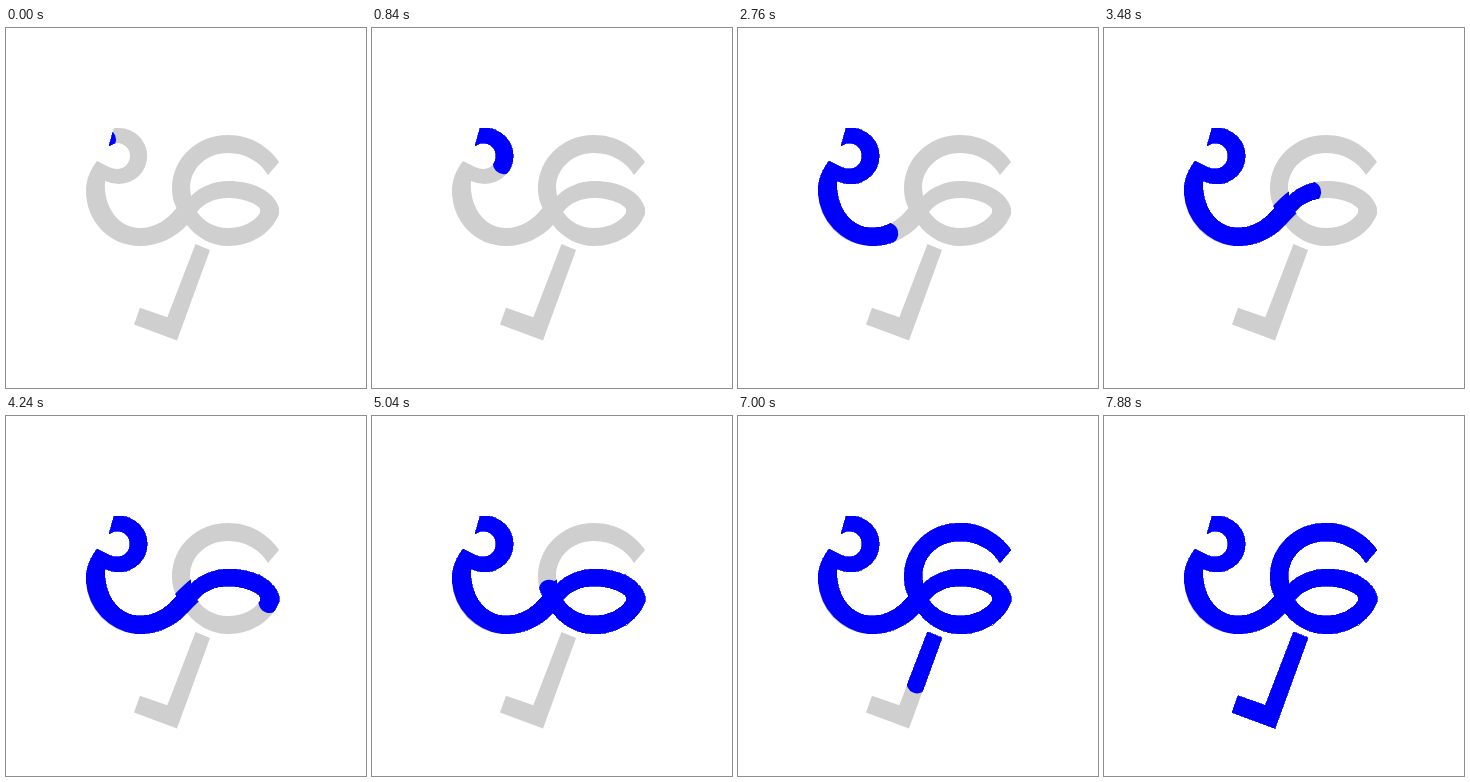
An HTML page that plays this animation: 360x360 px, repeating every 7920 ms.

```html
<!DOCTYPE html>
<html lang="en">
<head>
<meta charset="utf-8">
<title>Stroke order</title>
<style>
  html, body { margin: 0; width: 100%; height: 100%; overflow: hidden; background: #fff; }
  svg { display: block; width: 100%; height: 100%; }
  .ink { fill: #00f; stroke: #00f; stroke-width: .7; shape-rendering: crispEdges; }
  .pen {
    fill: none;
    stroke: #fff;
    stroke-width: 22;
    stroke-linecap: round;
    stroke-linejoin: miter;
  }
  .curl { stroke-dasharray: 600 1200; animation: curl 7920ms linear infinite; }
  .leg { stroke-dasharray: 140 300; animation: leg 7920ms linear infinite; }

  /* dash offset = dash length minus the distance drawn */
  @keyframes curl {
    0% { stroke-dashoffset: 599; }
    21.21% { stroke-dashoffset: 492; }
    34.85% { stroke-dashoffset: 398; }
    40.4% { stroke-dashoffset: 353; }
    50.5% { stroke-dashoffset: 278; }
    53.54% { stroke-dashoffset: 257; }
    60.6% { stroke-dashoffset: 187; }
    63.64% { stroke-dashoffset: 147; }
    70.7% { stroke-dashoffset: 102; }
    77.78% { stroke-dashoffset: 33; }
    80.05%, 100% { stroke-dashoffset: 0; }
  }
  @keyframes leg {
    0%, 79.4% { stroke-dashoffset: 165; }
    79.7% { stroke-dashoffset: 140; }
    90.9% { stroke-dashoffset: 62; }
    99.5%, 100% { stroke-dashoffset: 0; }
  }
</style>
</head>
<body>
<svg viewBox="0 0 360 360">
  <defs>
    <path id="glyph" fill-rule="evenodd" d="
      M108 100 Q110 100 113 100 A28.2 28 0 0 1 113 156 Q106 156 99 153
      C97 178 112 200 134 200 C149 200 161 192 170.5 180
      C167.5 174 166 168 166 161 C166 130 191 107 222 107
      C244 107 262 118 273 134 L262 147
      C254 134 240 125 222 125 C200 125 184 141 184 160 L185 168
      C194 159 208 153 222 153 C247 153 268 163 273 180 L273 186
      C266 205 245 218 222 218 C206 218 191 210 181 197
      C169 210 152 218 134 218 C103 218 80 193 80 163
      C80 152 84 142 91 133 L103 139
      Q107 141 111 141 A13 13 0 0 0 111 115 Q107 115 103 118 Z
      M191 184 C198 175 209 170 222 170 C237 170 252 176 254 181 L254 185
      C248 194 236 200 222 200 C209 200 198 194 191 184 Z
      M189.5 216 L204 222 L171 312.5 L128 296.5 L134 279.7 L161.3 289.3 Z"/>
    <mask id="drawn" maskUnits="userSpaceOnUse" x="0" y="0" width="360" height="360">
      <path class="pen curl" d="
        M98 112 L105.5 109 A20.2 20.2 0 1 1 113 148 L95 142
        A46 46 0 0 0 167.5 195.5
        C181 182 195 161.5 222 161.5 C245 161.5 264 173 264 183
        C264 193 244 209 222 209
        A46 46 0 1 1 245 123.2 C253 128 262 134 267.5 140.5"/>
      <path class="pen leg" d="M200.5 209.6 L166.5 301 L131 288"/>
    </mask>
  </defs>
  <use href="#glyph" fill="#cfcfcf"/>
  <g mask="url(#drawn)"><use href="#glyph" class="ink"/></g>
</svg>
</body>
</html>
```
